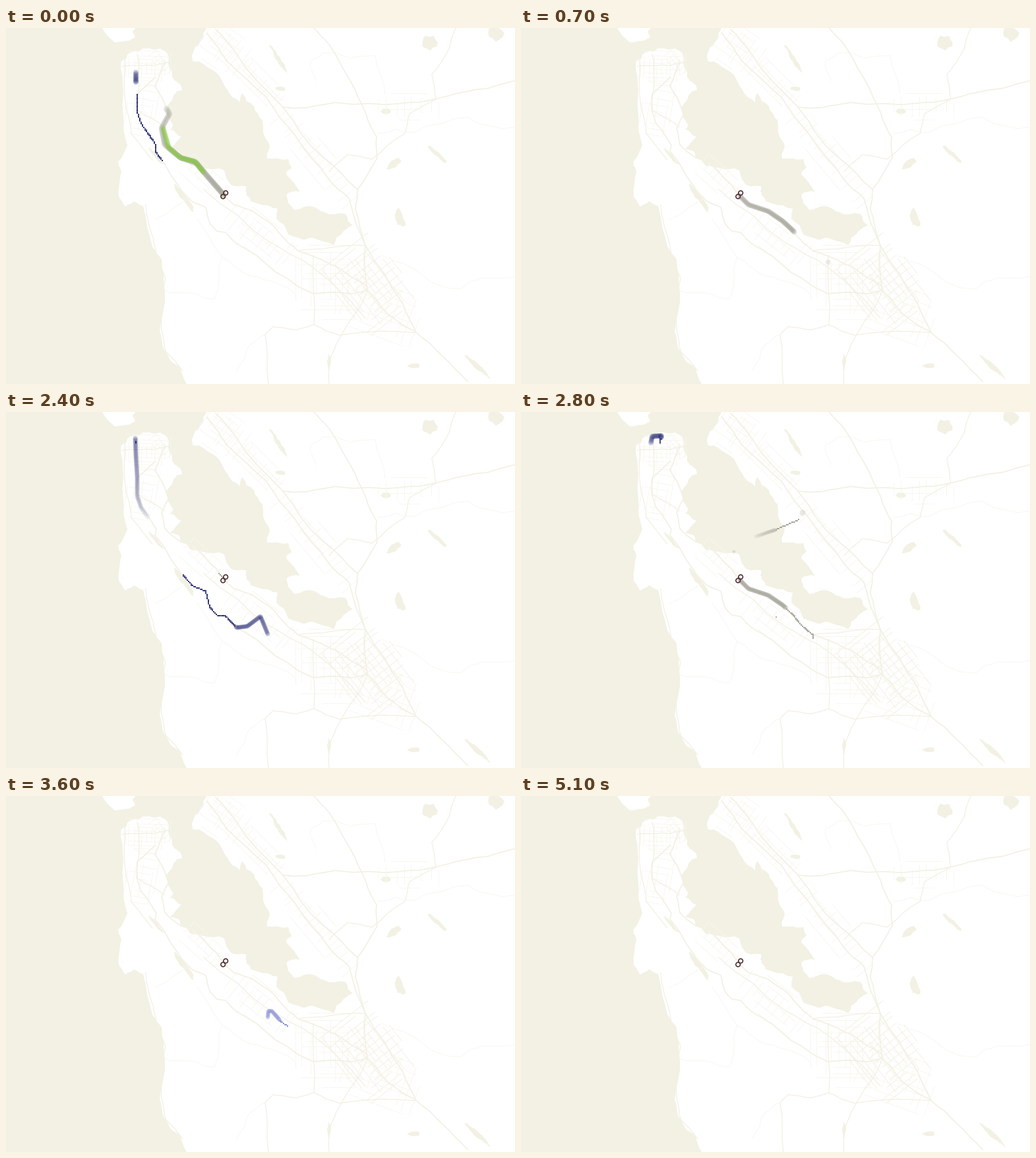
Write a matplotlib script that moves like this. It is 772 px wide and 540 px high and loops after 7700 ms.

```python
import numpy as np
import matplotlib.pyplot as plt
from matplotlib.animation import FuncAnimation
from matplotlib.collections import LineCollection, PolyCollection

W, H, DPI = 772, 540, 100
PX = 72 / DPI
FRAMES, STEP = 77, 100
WATER, STREET = "#f3f1e3", "#f8f7ee"
GREY, BLUE = (0.61, 0.61, 0.57), (0.11, 0.13, 0.42)
GREEN, PALE = (0.54, 0.79, 0.27), (0.50, 0.52, 0.82)
rng = np.random.default_rng(4)

fig = plt.figure(figsize=(W / DPI, H / DPI), dpi=DPI, facecolor="white")
ax = fig.add_axes([0, 0, 1, 1])
ax.set(xlim=(0, W), ylim=(H, 0))
ax.axis("off")


def rough(points, amount=0.1, rounds=2):
    """Break each segment up by shifting its middle sideways."""
    pts = np.array(points, float)
    for _ in range(rounds):
        d = np.diff(pts, axis=0)
        shift = rng.uniform(-amount, amount, (len(d), 1))
        mid = pts[:-1] + d / 2 + d[:, ::-1] * [-1, 1] * shift
        out = np.empty((2 * len(pts) - 1, 2))
        out[::2], out[1::2] = pts, mid
        pts = out
    return pts


def road(points, width=1.3, color=WATER, amount=0.04):
    ax.plot(*rough(points, amount).T, lw=width * PX, color=color,
            solid_joinstyle="round")


def lane(points):
    road(points, 0.9, STREET, 0.1)


def turned(points, angle):
    c, s = np.cos(np.radians(angle)), np.sin(np.radians(angle))
    return np.asarray(points) @ np.array([[c, s], [-s, c]])


def grid(cx, cy, w, h, angle, gap=9, color=STREET):
    """Street grid with lines of uneven length, turned by an angle."""
    lines = []
    for size, across in ((w, False), (h, True)):
        for k in np.linspace(-0.5, 0.5, max(3, round(size / gap))):
            a, b = rng.uniform(-0.5, -0.1), rng.uniform(0.1, 0.5)
            k += rng.uniform(-0.3, 0.3) * gap / size
            ends = [(a, k), (b, k)] if across else [(k, a), (k, b)]
            lines.append(turned(np.array(ends) * (w, h), angle) + (cx, cy))
    ax.add_collection(LineCollection(lines, linewidths=0.9 * PX, colors=color))


def lake(cx, cy, w, h, angle=0):
    """Ragged oval."""
    t = np.linspace(0, 2 * np.pi, 13)
    r = rng.uniform(0.7, 1.15, t.size)
    r[-1] = r[0]
    oval = np.c_[np.cos(t) * w, np.sin(t) * h] * r[:, None] / 2
    ax.fill(*rough(turned(oval, angle) + (cx, cy)).T, color=WATER, lw=0)


# Shores
north = [(0, 0), (146, 0), (153, 11), (165, 22), (187, 19), (196, 14),
         (192, 5), (197, 0)]
east_shore = [
    (304, 0), (299, 15), (284, 36), (283, 50), (300, 55), (317, 66),
    (336, 94), (355, 113), (358, 99), (376, 119), (389, 140), (399, 175),
    (396, 198), (428, 199), (433, 212), (425, 222), (446, 249), (425, 253),
    (437, 276), (468, 272), (482, 279), (515, 282), (526, 299), (501, 318),
    (496, 329), (464, 318), (450, 321), (428, 313), (410, 289), (412, 274)]
west_shore = [
    (412, 274), (381, 266), (365, 254), (364, 240), (337, 232), (331, 216),
    (299, 212), (265, 196), (262, 187), (249, 183), (266, 165), (248, 154),
    (253, 146), (245, 135), (247, 115), (267, 94), (252, 74), (247, 46),
    (241, 35), (208, 31), (200, 36), (188, 37), (174, 52)]
coast = [
    (174, 52), (178, 95), (184, 178), (170, 203), (175, 217), (171, 256),
    (181, 271), (194, 263), (208, 270), (222, 332), (236, 351), (241, 400),
    (233, 460), (239, 487), (250, 505), (264, 515), (274, 540)]
bay = np.vstack([north, rough(east_shore, 0.14), rough(west_shore, 0.18),
                 rough(coast, 0.06), [(0, H)]])
ax.add_collection(PolyCollection([bay], facecolors=WATER, edgecolors="none"))

lake(643, 22, 23, 22)
lake(743, 8, 26, 24)
lake(597, 288, 14, 30, -20)
lake(589, 206, 27, 11, -35)
lake(655, 192, 42, 7, 42)
lake(228, 195, 36, 5, 50)
lake(271, 258, 52, 9, 53)
lake(716, 514, 56, 8, 42)
lake(619, 512, 20, 8)
lake(576, 126, 16, 9)
lake(413, 46, 48, 7, 58)
lake(417, 92, 16, 8)
lake(490, 506, 6, 22)

# Streets
grid(214, 62, 68, 52, 2, 6)
grid(236, 52, 22, 36, -35, 5)
grid(207, 125, 45, 80, 10)
grid(330, 30, 70, 60, 35)
grid(375, 75, 110, 36, 45)
grid(470, 195, 170, 45, 50, 11)
grid(305, 230, 80, 36, 42)
grid(385, 315, 110, 50, 38, 11)
grid(490, 385, 100, 110, 0)
grid(550, 390, 130, 100, 52, 9, WATER)
grid(570, 430, 120, 80, 20, 12)
grid(610, 120, 90, 36, 0, 12)

# Routes shared by roads and trips
hub = (331, 254)
south = [hub, (345, 268), (375, 278), (397, 293), (410, 305), (428, 326),
         (443, 338)]
shore_road = [(243, 122), (248, 130), (236, 152), (241, 177), (265, 197),
              (288, 204), (303, 222), hub]
hills = [(386, 310), (366, 325), (350, 327), (333, 310), (320, 308),
         (309, 296), (303, 272), (282, 263), (262, 240), (238, 202),
         (226, 187), (228, 178), (205, 145), (199, 128), (199, 100)]
bridge = [hub, (306, 226), (338, 197), (353, 190), (385, 179), (422, 163),
          (428, 158)]
uptown = bridge + [(418, 135), (401, 120)]
valley = [(574, 392), (548, 392), (502, 362), (468, 347)]
green_leg = [(238, 151), (247, 182), (265, 197), (286, 202), (300, 219)]

lane([(240, 398), (280, 402), (316, 411), (328, 348), (290, 290)])
lane([(328, 348), (352, 365), (392, 382), (440, 405)])
lane([(772, 377), (722, 379), (690, 396), (605, 358), (570, 345)])
lane([(224, 291), (250, 276), (276, 260)])
lane([(393, 465), (370, 480), (350, 520)])
lane([(470, 80), (462, 50), (480, 38), (560, 42), (575, 100)])
lane([(563, 160), (620, 158), (700, 135), (772, 150)])

center = (548, 398)
east_gate = (533, 245)
junction = (545, 330)
road([(241, 50), (226, 88)] + shore_road + south[1:] + valley[:0:-1], 1.7)
road([center, (580, 435), (620, 460), (662, 498), (700, 536)], 1.7)
road([(226, 75)] + hills[:1:-1], 1.7)
road([hills[2], (380, 345), (440, 390), (466, 403), (520, 403), center], 1.7)
road([(305, 8), (335, 50), (395, 105), (440, 165), (490, 230), (520, 258),
      junction, center], 1.7)
road([(318, 2), (350, 40), (420, 120), (455, 121), (500, 113), (602, 114),
      (650, 108), (690, 98), (772, 80)], 1.7)
road([(420, 120), (450, 163), (510, 222), east_gate], 1.7)
road([(467, 0), (490, 25), (530, 95), (546, 130), (562, 165), (563, 197),
      east_gate, (530, 275), junction, (600, 415), (622, 462)], 1.7)
road([(490, 218), (518, 192), (555, 199), (605, 160), (612, 130), (652, 108),
      (646, 70), (672, 32), (682, 0)])
road([(180, 45), (182, 120), (190, 160), (222, 200)])
road([(212, 268), (217, 300), (242, 380), (236, 460), (242, 490), (268, 520)])
road([(398, 540), (393, 465), (405, 453), (440, 458), (467, 450)])
road([(490, 540), (492, 500), (512, 460), center])
road([(466, 345), (467, 450), (505, 466), (620, 462)])
road([south[-1], (480, 335), junction])
road([(199, 40), (202, 75), (198, 125), (240, 150)])
road([(176, 58), (225, 57), (246, 52)])
road([(300, 245), (400, 325), (450, 352), (500, 392), (545, 440)])

trips = []


def trip(route, start, speed, last, color=GREY, radius=3.6, life=3):
    """Sample a route; times count in frames, speed in pixels per frame."""
    pts = np.array(route, float)
    run = np.r_[0, np.cumsum(np.hypot(*np.diff(pts, axis=0).T))]
    s = np.arange(0, run[-1] + 0.1, 1.5)
    xy = np.c_[np.interp(s, run, pts[:, 0]), np.interp(s, run, pts[:, 1])]
    trips.append((xy, start + s / speed, start, last, color, radius, life))


def halt(x, y, start, last, radius=2, life=3, color=GREY):
    trip([(x, y), (x + 0.5, y)], start, 9, last, color, radius, life)


trip([(197, 67), (197, 83)], -2.6, 10, 0, BLUE, 4, 3.6)
trip(hills[::-1], -0.97, 118, 4, BLUE, 3.5, 2.2)
trip(shore_road, -3.4, 85, 3, GREY, 4.5, 4)
trip(green_leg, -2.5, 85, 3, GREEN, 4, 5)
halt(329, 255, -1.1, 2, 3.5, 4, GREEN)
trip(valley + south[::-1], 0.5, 110, 4)
trip(south[:5] + [(415, 310)], 4.5, 90, 7, GREY, 4, 4.5)
halt(466, 355, 4.5, 8, 3.8, 4)
trip(south + [(466, 346), (467, 394)], 8.2, 45, 16, GREY, 4, 3.7)

halt(397, 336, 19.5, 20, 2, 1.5)
trip(hills + [(197, 65), (196, 38)], 18.8, 133, 24, BLUE, 3.6, 3.2)
trip([(397, 337)] + hills, 22.4, 120, 26, BLUE, 3.5, 2.4)
trip([(197, 47), (199, 37), (213, 36), (211, 47)], 23.5, 8, 28, BLUE, 4, 6)
trip(bridge, 23.7, 40, 29, GREY, 3, 1.85)
halt(427, 153, 26.5, 29, 4.5)
halt(323, 212, 26.9, 29, 2.5)
halt(387, 310, 27.5, 28)
trip(south + [(443, 358), (448, 378), (459, 380)], 25.7, 65, 34, life=9)
trip([(375, 278), (369, 290), (374, 298)], 29, 20, 34, GREY, 3, 6)
trip(uptown, 28.1, 63, 34, life=7)
trip([(279, 201)] + green_leg[2:0:-1] + [(241, 163), (228, 165)], 29, 60, 33,
     GREEN, 4, 7)
halt(418, 344, 31.5, 33)

trip([(397, 336), (398, 326), (403, 326), (418, 343), (432, 352), (470, 365),
      (551, 374)], 32.9, 16, 40, PALE, 3.2, 8)
trip(uptown[::-1], 36.2, 85, 40)
trip(valley[1:] + south[::-1], 36.4, 90, 40)
trip(uptown[::-1], 43.8, 190, 45)
trip([(401, 112), (440, 165), (490, 230), (535, 255)], 44.2, 240, 45)
trip(valley + south[::-1], 47.2, 130, 50)
trip(uptown[::-1], 47.3, 110, 50)

fat = ax.scatter([], [], marker="o", linewidths=0, zorder=4)
thin = ax.scatter([], [], marker="s", linewidths=0, zorder=5,
                  s=(1.9 * PX) ** 2)

# Hub marker: two touching rings
for side in (-1, 1):
    ax.add_patch(plt.Circle((331.2 + 2 * side, 252.9 - 2.7 * side), 3.3,
                            fill=False, ec="#4d2a30", lw=1.6 * PX, zorder=6))


def tint(color, alpha):
    return np.c_[np.tile(color, (len(alpha), 1)), alpha]


def update(frame):
    spots, sizes, tones = [np.empty((0, 2))], [np.empty(0)], [np.empty((0, 4))]
    dots, dot_tones = [np.empty((0, 2))], [np.empty((0, 4))]
    for xy, passed, start, last, color, radius, life in trips:
        if not start <= frame <= last:
            continue
        age = frame - passed
        new = (age >= 0) & (age < 1)
        old = (age >= 1) & (age < life)
        dots.append(np.floor(xy[new] / 2) * 2 + 1)
        dot_tones.append(tint(color, np.full(new.sum(), 0.8)))
        spots.append(xy[old])
        sizes.append(np.full(old.sum(), (2 * radius * PX) ** 2))
        tones.append(tint(color, 0.32 * (1 - age[old] / life) ** 0.6))
    fat.set_offsets(np.vstack(spots))
    fat.set_sizes(np.concatenate(sizes))
    fat.set_facecolors(np.vstack(tones))
    thin.set_offsets(np.vstack(dots))
    thin.set_facecolors(np.vstack(dot_tones))
    return fat, thin


anim = FuncAnimation(fig, update, frames=FRAMES, interval=STEP, repeat=True,
                     repeat_delay=0, init_func=lambda: update(0))
plt.show()
```
